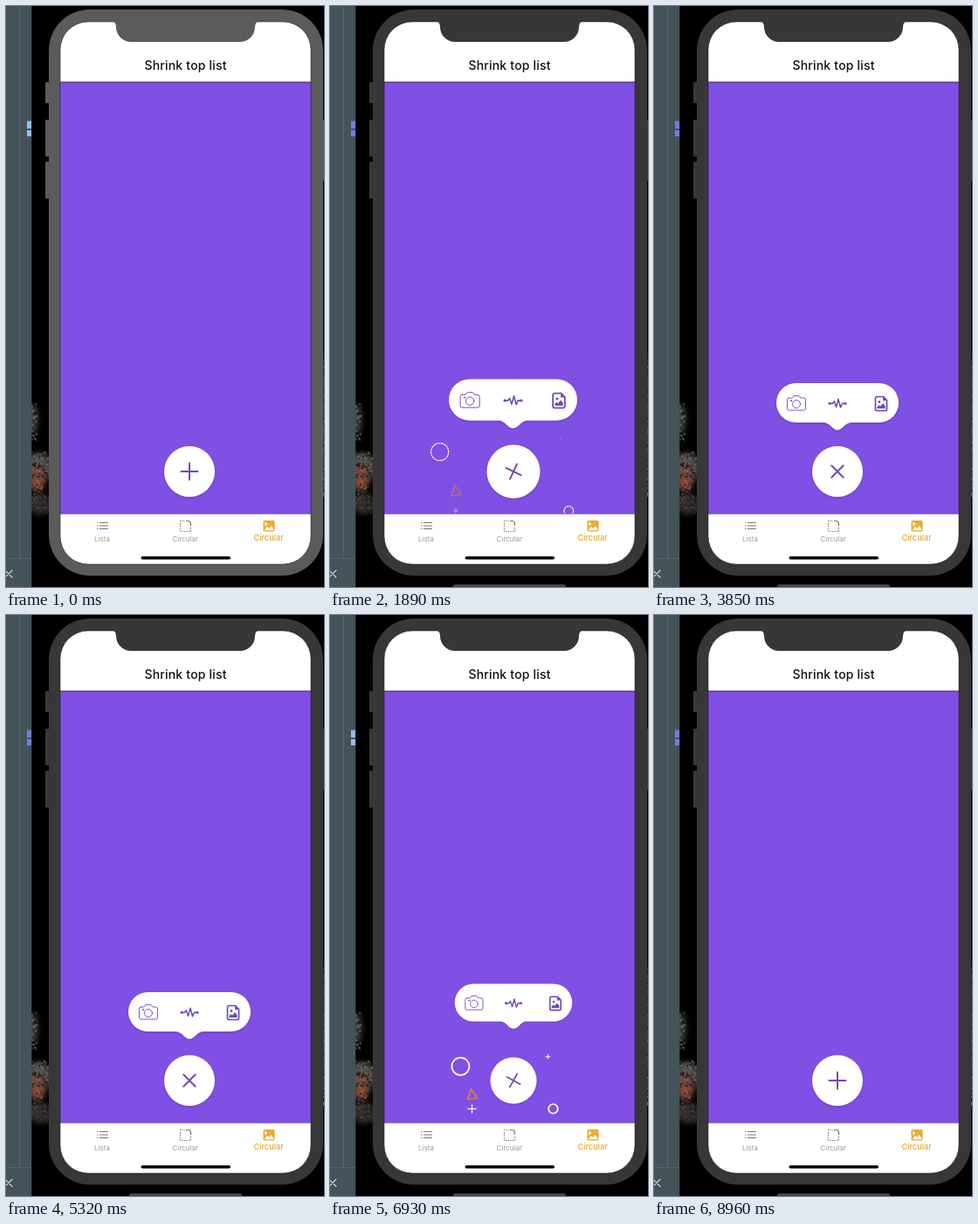
Recreate the animation shown at these times as an HTML page. Size 364 by 664 pixels, loop 9.03 s.

```html
<!DOCTYPE html>
<html lang="en">
<head>
<meta charset="utf-8">
<title>Floating menu</title>
<style>
html, body { margin: 0; width: 100%; height: 100%; overflow: hidden; background: #000; }
svg { display: block; width: 364px; height: 664px; }
text { font-family: Inter, Roboto, sans-serif; text-anchor: middle; }
.line { fill: none; stroke-linecap: round; stroke-linejoin: round; }
</style>
</head>
<body>
<svg viewBox="0 0 364 664">
  <defs>
    <clipPath id="view"><rect x="62" y="87" width="287" height="493"/></clipPath>
    <clipPath id="screen"><rect x="62" y="18" width="287" height="620" rx="32"/></clipPath>
    <filter id="soft" x="-50%" y="-50%" width="200%" height="200%"><feGaussianBlur stdDeviation="3"/></filter>
    <filter id="shade" x="-20%" y="-20%" width="140%" height="150%">
      <feDropShadow dx="0" dy="1" stdDeviation=".8" flood-color="#2b1260" flood-opacity=".3"/>
    </filter>
  </defs>

  <rect width="364" height="664"/>
  <g filter="url(#soft)">
    <ellipse cx="31" cy="472" rx="5" ry="17" fill="#4a4a4a"/>
    <ellipse cx="37" cy="528" rx="15" ry="17" fill="#55504e"/>
    <ellipse cx="35" cy="540" rx="10" ry="14" fill="#7a4838"/>
    <ellipse cx="39" cy="569" rx="14" ry="12" fill="#2d2b2b"/>
    <ellipse cx="365" cy="480" rx="4" ry="80" fill="#4c4c4c"/>
  </g>
  <g id="rocks"></g>

  <rect width="29.300" height="664" fill="#44525a"/>
  <path d="M15.500 0V631M0 631.500H29" stroke="#56646c" fill="none"/>
  <path class="line" d="M-1 645l8 8m0-8l-8 8" stroke="#d5dadd" stroke-width="1.2"/>
  <g id="mark"><rect x="24" y="131.500" width="5" height="8.500"/><rect x="24" y="142" width="5" height="7"/></g>

  <rect id="dock" x="141" y="661" width="129" height="6" rx="2" fill="#454545"/>
  <g id="bezel">
    <rect x="49" y="4" width="314" height="647" rx="47"/>
    <path d="M45 87h5v24h-5zM45 130h5v42h-5zM45 178h5v42h-5zM361 130h3v70h-3z"/>
  </g>
  <g clip-path="url(#screen)">
    <rect x="62" y="18" width="287" height="620" fill="#fff"/>
    <rect x="62" y="87" width="287" height="493" fill="#8050e4"/>
    <path d="M62 87H349" stroke="#33264f"/>
    <path d="M62 580.500H349" stroke="#8c7bb8"/>
  </g>
  <rect x="62" y="18" width="287" height="620" rx="32" fill="none" stroke="#1c1c1c" stroke-opacity=".6"/>
  <path id="notch" d="M119 17h173q-7 0-7 7a17 17 0 0 1-17 17H143a17 17 0 0 1-17-17q0-7-7-7z"/>
  <text x="205.600" y="73" font-size="14" font-weight="500" letter-spacing=".2" fill="#111">Shrink top list</text>

  <g clip-path="url(#view)">
    <g id="bits" class="line"></g>
    <g id="bubble" filter="url(#shade)">
      <path fill="#fff" d="M-47.500-22.500H47.500a22.500 22.500 0 0 1 0 45H16Q11 22.500 6 28Q0 34-6 28Q-11 22.500-16 22.500H-47.500a22.500 22.500 0 0 1 0-45z"/>
      <g class="line" stroke="#7048b8">
        <g transform="translate(-47 .5)" stroke-width=".9">
          <path d="M-8.500-6H-5l2-2.500h6L5-6h3.500q2 0 2 2V6q0 2-2 2h-17q-2 0-2-2V-4q0-2 2-2z"/>
          <circle cy="1" r="4.500"/><circle cx="-6" cy="-3" r=".7"/>
        </g>
        <g transform="translate(0 .8)">
          <path stroke-width="1.500" d="M-9 0h3.500l1.800-2.500L-1.500 4 1-5 3.500 4.500 5.500 0H9"/>
          <g fill="#7048b8" stroke="none"><circle cx="-9" r="1.500"/><circle cx="9" r="1.500"/></g>
        </g>
        <g transform="translate(50 1)">
          <path stroke-width="1.700" d="M-4.500-8H2.500L6.500-4V6q0 2-2 2h-9q-2 0-2-2V-6q0-2 2-2z"/>
          <path fill="#7048b8" stroke="none" d="M-4.500 5.500v-2l2-2L-1 3l3-3.500 2.500 3v3zM2-8v4.500h4.500z"/>
          <circle cx="-2" cy="-2" r="1.400" fill="#7048b8" stroke="none"/>
        </g>
      </g>
    </g>
    <circle id="disc" cx="210" cy="532" r="29" fill="#fff" filter="url(#shade)"/>
    <path id="plus" class="line" d="M-9.500 0H9.500M0-9.500V9.500" stroke="#7446a6" stroke-width="1.900"/>
  </g>

  <g fill="none" stroke="#777" stroke-width="1.200">
    <path d="M107 590.500h10M107 594h10M107 597.500h10"/>
    <path d="M104 590.500h1.500M104 594h1.500M104 597.500h1.500"/>
    <path d="M206 588.500h2q3.500 0 3.500 3.500v2"/>
    <path d="M199 588.500h6M199.500 591v10M201 600.500h11M211.500 596v4" stroke-dasharray="1.400 1.300"/>
  </g>
  <rect x="294.500" y="588" width="13" height="12.500" rx="1.500" fill="#e8a832"/>
  <path d="M296 599l3-4 2.200 2.400 2.300-3.400 3 5zM297 589.500l.7 1.800 1.800.7-1.800.7-.7 1.800-.7-1.800zM304 590l-3 3" fill="#fff" stroke="#fff" stroke-width=".4"/>
  <g font-size="8" fill="#999">
    <text x="110" y="611.500">Lista</text>
    <text x="205.300" y="611.500">Circular</text>
    <text x="300.600" y="611.300" font-size="9.200" font-weight="500" fill="#e8a832">Circular</text>
  </g>
  <rect x="154.500" y="629" width="102.500" height="3.500" rx="1.750" fill="#000"/>
</svg>
<script>
const LOOP = 9030, STEP = 70;
const el = id => document.getElementById(id);

// Columns: time, bubble scale, bubble x, bubble y, disc radius, icon angle
const opening = [
  [0, 0, 210, 512, 29, 0],
  [70, .3, 210, 495, 27.5, 5],
  [140, .7, 210, 463, 26.5, 16],
  [210, .96, 210, 443, 26.5, 29],
  [350, 1.12, 210, 440, 29, 52],
  [490, 1.1, 209.5, 445, 31, 43],
  [630, 1.05, 209.5, 450, 30.5, 25],
  [770, 1, 210, 453.5, 29, 45]
];
const closing = [
  [0, 1, 210, 453.5, 29, 45],
  [100, 1.08, 208.5, 448, 27.5, 38],
  [210, 1.14, 206.5, 444, 26.5, 25],
  [350, .6, 208.5, 475, 29, 8],
  [490, 0, 210, 512, 30, -5],
  [630, 0, 210, 512, 29.4, 2],
  [840, 0, 210, 512, 29, 0]
];
const taps = [
  [1260, opening], [2590, closing], [3080, opening], [4060, closing],
  [4550, opening], [5600, closing], [6720, opening], [7700, closing]
];

function pose(table, time) {
  const next = table.findIndex(row => row[0] > time);
  if (next < 0) return table.at(-1);
  const a = table[next - 1], b = table[next];
  const k = (time - a[0]) / (b[0] - a[0]);
  return a.map((v, i) => v + (b[i] - v) * k);
}

function svgNode(name, attrs, parent) {
  const node = document.createElementNS('http://www.w3.org/2000/svg', name);
  for (const key in attrs) node.setAttribute(key, attrs[key]);
  parent.append(node);
  return node;
}

let seed = 11;
const random = () => (seed = seed * 16807 % 2147483647) / 2147483647;
function speckle(count, x, y, width, height, colors) {
  for (let i = 0; i < count; i++) {
    svgNode('circle', {
      cx: x + random() * width, cy: y + random() * height, r: .5 + random() * 1.2,
      fill: colors[i % colors.length], opacity: .75
    }, el('rocks'));
  }
}
const greys = ['#6e6e6e', '#484848', '#151515'];
speckle(40, 29, 455, 6, 42, greys);
speckle(110, 29, 510, 19, 30, greys);
speckle(60, 29, 525, 17, 28, ['#9a5638', '#6b4334', '#2a1c18']);
speckle(60, 29, 552, 19, 28, ['#3c3a3a', '#1c1c1c', '#4c4643']);
speckle(60, 362.500, 395, 2, 165, greys);

const cross = r => `M${-r} 0H${r}M0 ${-r}V${r}`;
const ring = r => `M${-r} 0a${r} ${r} 0 1 0 ${2 * r} 0a${r} ${r} 0 1 0 ${-2 * r} 0`;
// Offset, shape, colour, line width, final scale
const bits = [
  [-60, -16, ring(10), '#fff', 1.7, 1],
  [-47, 15.5, 'M-1-6L6 4.500L-5 6z', '#cc7c55', 1.8, 1],
  [-47, 32, cross(4.7), '#fff', 1.2, .6],
  [45, 32, ring(5.3), '#fff', 1.7, 1],
  [39, -27, cross(2.4), '#fff', 1, .25]
].map(([x, y, d, stroke, width, end]) => ({ x, y, width, end, node: svgNode('path', { d, stroke }, el('bits')) }));

function drawBits(time) {
  const alive = time > 0 && time < 735;
  el('bits').style.display = alive ? '' : 'none';
  if (!alive) return;
  const reach = 1.445 * (1 - Math.exp(-time / 175));
  const late = Math.max(0, Math.min(1, (time - 210) / 420));
  for (const { x, y, width, end, node } of bits) {
    const size = 1 + (end - 1) * late;
    node.setAttribute('transform', `translate(${210 + x * reach} ${532 + y * reach}) scale(${size})`);
    node.setAttribute('stroke-width', width * (1 - .3 * late));
    node.setAttribute('stroke-dasharray', late > .75 ? '1.6 1.5' : 'none');
  }
}

function draw(t) {
  const tap = taps.findLast(([start]) => start <= t);
  const [, scale, x, y, radius, angle] = tap ? pose(tap[1], t - tap[0]) : closing.at(-1);
  el('bubble').style.display = scale > .01 ? '' : 'none';
  el('bubble').setAttribute('transform', `translate(${x} ${y}) scale(${scale})`);
  el('disc').setAttribute('r', radius);
  el('plus').setAttribute('transform', `translate(210 532) rotate(${angle}) scale(${Math.min(1, radius / 29)})`);
  drawBits(tap && tap[1] === opening ? t - tap[0] : -1);

  const dim = Math.min(1, t / 420);
  const tone = Math.round(91 - 36 * dim);
  for (const id of ['bezel', 'notch']) el(id).setAttribute('fill', `rgb(${tone},${tone},${tone})`);
  el('dock').setAttribute('opacity', dim);
  el('mark').setAttribute('fill', t < 350 || (t >= 6720 && t < 7420) ? '#92bdf6' : '#6e7ee6');
}

const begin = performance.now();
function tick() {
  const t = (performance.now() - begin) % LOOP;
  draw(Math.floor(t / STEP) * STEP);
  requestAnimationFrame(tick);
}
tick();
</script>
</body>
</html>
```
